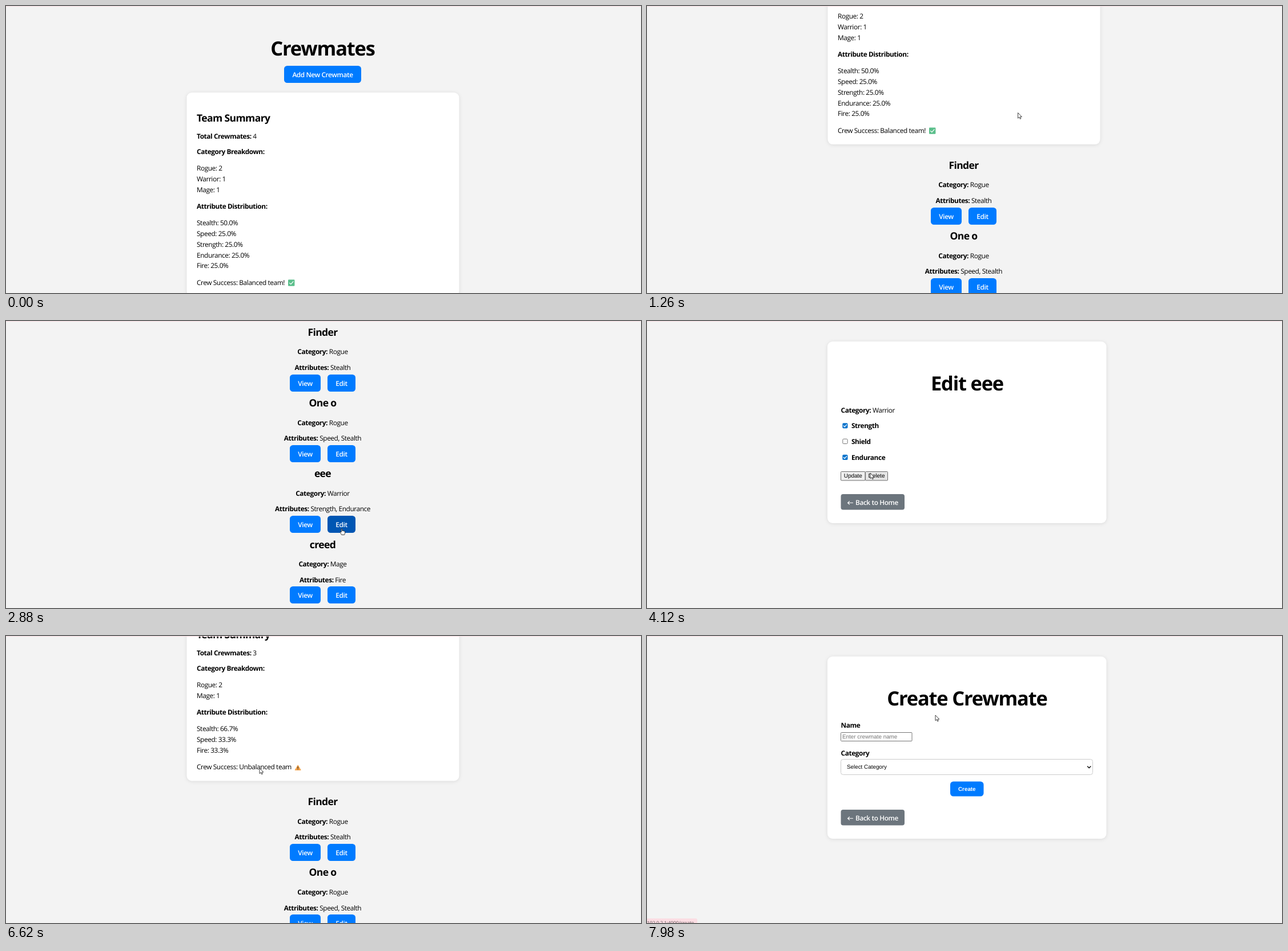
Recreate the animation shown at these times as an HTML page. Size 1112 by 504 pixels, loop 8000 ms.

```html
<!DOCTYPE html>
<html lang="en">
<head>
<meta charset="utf-8">
<title>Crewmates</title>
<style>
  html, body { margin: 0; width: 100%; height: 100%; overflow: hidden; background: #f3f3f3; }
  svg { display: block; width: 1112px; height: 504px; }
  text { font: 11.85px "Open Sans", "Noto Sans", sans-serif; letter-spacing: -.034em; fill: #000; text-rendering: geometricPrecision; }
  .b { font-weight: 700; }
  .h1 { font-size: 34.4px; font-weight: 700; }
  .h2 { font-size: 17.5px; font-weight: 700; }
  .mid { text-anchor: middle; }
  .label { font-weight: 600; fill: #fff; }
  .form { font: 10px "Liberation Sans", Arial, sans-serif; letter-spacing: 0; }
  .hint { font-size: 9.85px; fill: #757575; }
  .option { font-size: 9.85px; }
  .submit { font-size: 9.8px; font-weight: 700; fill: #fff; }
  .url { font-size: 8.8px; fill: #6b5f63; }
  .card { fill: #fff; filter: drop-shadow(0 1.5px 3px rgba(0, 0, 0, .1)); }
  .primary { fill: #007bff; }
  .primary.hover { fill: #0056b3; }
  .back { fill: #6c757d; }
  .back.hover { fill: #5a6268; }
  .plain { fill: #efefef; stroke: #6b6b6b; }
  .plain.hover { fill: #e5e5e5; }
  .plain.pressed { fill: #f5f5f5; }
  .field { fill: #fff; stroke: #767676; }
  .select { fill: #fff; stroke: #ccc; }
  .checked { fill: #0b74cc; }
  .ok { fill: #5bbf8b; }
  .warning { fill: #f5a34a; stroke: #f5a34a; stroke-linejoin: round; }
  .line { fill: none; stroke-linecap: round; stroke-linejoin: round; }
  .pointer { fill: #fff; stroke: #222; stroke-width: .85; stroke-linejoin: round; }
</style>
</head>
<body>
<svg id="stage" viewBox="0 0 1112 504"></svg>
<script>
const LOOP = 8000;
const MID = 554.5;      // centre line of the home page
const LINE = 18.87;     // list line height
const CREW_STEP = 124.25;

// Baselines sit on whole pixels, as in laid-out page text.
const text = (x, y, body, cls = '') => `<text x="${x}" y="${Math.round(y)}" class="${cls}">${body}</text>`;
const rect = (x, y, w, h, r, cls) => `<rect x="${x}" y="${y}" width="${w}" height="${h}" rx="${r}" class="${cls}"/>`;
const line = (d, color, width) => `<path d="${d}" class="line" stroke="${color}" stroke-width="${width}"/>`;
const pair = (key, value) => `<tspan class="b">${key}:</tspan> ${value}`;

const linkButton = (x, y, w, label) =>
  rect(x, Math.round(y), w, 30, 5.5, 'primary hot link') +
  text(x + w / 2, Math.round(y) + 20, label, 'label mid');

const backButton = y =>
  rect(339.5, y, 111.5, 27.5, 4, 'back hot link') +
  line(`M360.5 ${y + 15.3}h-9m3 -2.7l-3 2.7l3 2.7`, '#fff', 1.1) +
  text(365, y + 18.6, 'Back to Home', 'label');

const tick = (x, y, s, width) =>
  line(`M${x + s * .22} ${y + s * .52}l${s * .2} ${s * .2}l${s * .37} ${-s * .42}`, '#fff', width);

const balancedIcon = y => rect(494, y - 9.4, 11.4, 11.4, 1.2, 'ok') + tick(494, y - 9.4, 11.4, 1.3);
const warningIcon = y =>
  `<path class="warning" d="M511.2 ${y - 7.4}l5 8.6h-10z"/>` +
  line(`M511.2 ${y - 4.5}v2.8M511.2 ${y - .1}v.1`, '#40362f', 1.3);

function home({ crew, categories, attributes, verdict, icon }) {
  let y = 260.2, rows = '';
  const list = items => {
    y += 28.8;
    items.forEach((item, i) => {
      if (i) y += LINE;
      rows += text(334, y, item);
    });
    y += 29.4;
  };
  rows += text(334, 203.2, 'Team Summary', 'h2');
  rows += text(334, 232.6, pair('Total Crewmates', crew.length));
  rows += text(334, y, 'Category Breakdown:', 'b');
  list(categories);
  rows += text(334, y, 'Attribute Distribution:', 'b');
  list(attributes);
  rows += text(334, y, 'Crew Success: ' + verdict) + icon(y);
  const bottom = y + 20.2;

  const members = crew.map(([name, category, skills], i) => {
    const top = bottom + i * CREW_STEP;
    return text(MID, top + 42.8, name, 'h2 mid') +
      text(MID, top + 75.3, pair('Category', category), 'mid') +
      text(MID, top + 102.9, pair('Attributes', skills), 'mid') +
      linkButton(497, top + 110.6, 54, 'View') +
      linkButton(563, top + 110.6, 49, 'Edit');
  });
  return text(MID, 86.6, 'Crewmates', 'h1 mid') +
    linkButton(487, 105.3, 135, 'Add New Crewmate') +
    rect(316.5, 152, 477, bottom - 152, 9, 'card') + rows + members.join('');
}

function checkbox(y, label, checked) {
  const box = checked
    ? rect(342.3, y - 9, 9.2, 9.2, 1.8, 'checked') + tick(342.3, y - 9, 9.2, 1.3)
    : rect(342.8, y - 8.8, 8.3, 8.3, 1.6, 'field');
  return box + text(358, y, label, 'b');
}

const formCard = (height, title) =>
  rect(316, 36, 488.5, height, 9, 'card') + text(560.5, 122, title, 'h1 mid');

const editPage = formCard(319, 'Edit eee') +
  text(339.5, 161, pair('Category', 'Warrior')) +
  checkbox(188.3, 'Strength', true) +
  checkbox(216, 'Shield', false) +
  checkbox(243.8, 'Endurance', true) +
  rect(339.5, 264.5, 42.5, 15.5, 1, 'plain hot') + text(360.8, 275, 'Update', 'form mid') +
  rect(382.5, 264.5, 39, 15.5, 1, 'plain hot') + text(402, 275, 'Delete', 'form mid') +
  backButton(304);

const createPage = formCard(320, 'Create Crewmate') +
  text(339.5, 161, 'Name', 'b') +
  rect(339.5, 169.5, 124.5, 15, 1, 'field') + text(342, 180, 'Enter crewmate name', 'form hint') +
  text(339.5, 210, 'Category', 'b') +
  rect(339.5, 216.5, 441, 27, 4, 'select') + text(350, 233, 'Select Category', 'form option') +
  line('M771.5 229l2.7 2.7l2.7 -2.7', '#111', 1.5) +
  rect(531, 255.5, 58.5, 26, 5.5, 'primary hot') + text(560.3, 272, 'Create', 'form submit mid') +
  backButton(305);

const finder = ['Finder', 'Rogue', 'Stealth'];
const oneO = ['One o', 'Rogue', 'Speed, Stealth'];
const eee = ['eee', 'Warrior', 'Strength, Endurance'];
const creed = ['creed', 'Mage', 'Fire'];

const pages = {
  full: home({
    crew: [finder, oneO, eee, creed],
    categories: ['Rogue: 2', 'Warrior: 1', 'Mage: 1'],
    attributes: ['Stealth: 50.0%', 'Speed: 25.0%', 'Strength: 25.0%', 'Endurance: 25.0%', 'Fire: 25.0%'],
    verdict: 'Balanced team!', icon: balancedIcon
  }),
  edit: editPage,
  reduced: home({
    crew: [finder, oneO, creed],
    categories: ['Rogue: 2', 'Mage: 1'],
    attributes: ['Stealth: 66.7%', 'Speed: 33.3%', 'Fire: 33.3%'],
    verdict: 'Unbalanced team', icon: warningIcon
  }),
  create: createPage
};

const stage = document.getElementById('stage');
stage.innerHTML =
  Object.entries(pages).map(([id, body]) => `<g id="${id}">${body}</g>`).join('') +
  `<g id="status"><path d="M0 496h85q3 0 3 3v5H0z" fill="#fbdde3"/>${text(0, 507, '', 'url')}</g>
   <rect width="1112" height="1" fill="#f9dde2"/>
   <path id="arrow" class="pointer" d="M0 0V9.6L2.3 7.6 3.8 10.9 5.3 10.2 3.9 7.1H6.8Z"/>
   <path id="hand" class="pointer" d="M-.3 11.5L-2.5 7.6Q-3.4 6-1.9 6L-.8 7V1Q0 0 .8 1V4.6Q3.2 4.2 5.5 5.6V8.8L4.6 11.5Z"/>`;

const el = id => document.getElementById(id);
const [arrow, hand, status] = ['arrow', 'hand', 'status'].map(el);
const url = status.querySelector('text');

const hotspots = {};
for (const id in pages) {
  hotspots[id] = [...el(id).querySelectorAll('.hot')].map(node => {
    const { x, y, width, height } = node.getBBox();
    return { node, x, y, width, height, link: node.classList.contains('link') };
  });
}

const schedule = [[0, 'full'], [3220, 'edit'], [4730, 'reduced'], [7700, 'create']];

// [time, offset]
const scrollKeys = [[720, 0], [920, 97], [1720, 496], [1860, 527], [3220, 527], [3220, 0],
  [5100, 0], [5540, 304], [5730, 346], [6380, 346], [6620, 199], [7080, 52], [7700, 52], [7700, 0]];

// [time, x, y]
const cursorKeys = [[100, 1080, 260], [720, 652.5, 188.5], [980, 652.5, 188.5], [1720, 643.5, 185.5],
  [2080, 643.5, 185.5], [2880, 588, 364], [3300, 588, 364], [3740, 438, 317], [4120, 391, 267],
  [4930, 391, 267], [5420, 436, 242], [5560, 436, 242], [5730, 442, 232], [5920, 442, 232],
  [6000, 444, 232], [6700, 444, 232], [7150, 469, 216], [7380, 516, 66], [7700, 516, 66], [7960, 505, 139]];

const statusKeys = [[2950, 3600, '192.0.2.1:4000/edit/3'], [7570, 8000, '192.0.2.1:4000/create']];

function sample(keys, t, ease = k => k) {
  if (t <= keys[0][0]) return keys[0].slice(1);
  const next = keys.findIndex(key => key[0] > t);
  if (next < 0) return keys.at(-1).slice(1);
  const a = keys[next - 1], b = keys[next];
  const k = ease((t - a[0]) / (b[0] - a[0]));
  return a.slice(1).map((v, i) => v + (b[i + 1] - v) * k);
}
const smooth = k => k * k * (3 - 2 * k);
const show = (node, on) => { node.style.display = on ? '' : 'none'; };

function render(t) {
  const page = schedule.findLast(([start]) => start <= t)[1];
  const scroll = Math.round(sample(scrollKeys, t)[0]);
  const [x, y] = sample(cursorKeys, t, smooth);
  const visible = t >= 120;
  for (const id in pages) show(el(id), id === page);
  el(page).setAttribute('transform', `translate(0 ${-scroll})`);

  let overLink = false;
  for (const spot of hotspots[page]) {
    const dx = x - spot.x, dy = y + scroll - spot.y;
    const over = visible && dx >= 0 && dx <= spot.width && dy >= 0 && dy <= spot.height;
    spot.node.classList.toggle('hover', over);
    spot.node.classList.toggle('pressed', over && t >= 4330 && t < 4470);
    overLink ||= over && spot.link;
  }
  for (const node of [arrow, hand]) node.setAttribute('transform', `translate(${x} ${y})`);
  show(arrow, visible && !overLink);
  show(hand, visible && overLink);

  const tip = statusKeys.find(([from, to]) => t >= from && t < to);
  show(status, tip);
  if (tip) {
    url.textContent = tip[2];
    status.setAttribute('opacity', Math.min(1, (t - tip[0] + 60) / 130));
  }
}

function loop() {
  render(performance.now() % LOOP);
  requestAnimationFrame(loop);
}
loop();
</script>
</body>
</html>
```
